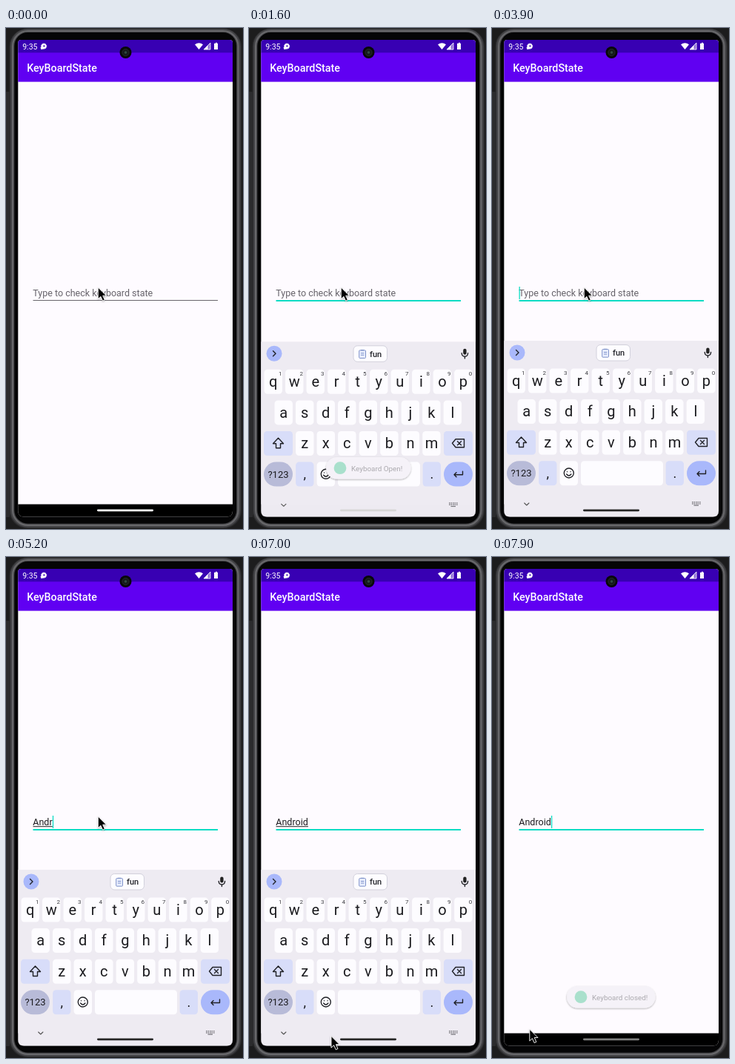
An HTML page for the animation above (8000 ms loop, 320 by 676 pixels).

```html
<!DOCTYPE html>
<html lang="en">
<head>
<meta charset="utf-8">
<title>Keyboard state</title>
<style>
  html, body { margin: 0; width: 100%; height: 100%; overflow: hidden; background: #1c1c1d; }
  svg { display: block; width: 100%; height: 100%; font-family: Roboto, sans-serif; }
  .line { fill: none; stroke: #202126; stroke-width: 1.4; stroke-linecap: round; stroke-linejoin: round; }
  .mid { text-anchor: middle; }
</style>
</head>
<body>
<svg viewBox="0 0 320 676">
  <defs>
    <clipPath id="screenClip"><path d="M20.3 16H302Q306 16 306 20V651.5Q306 659.5 298 659.5H24.3Q16.3 659.5 16.3 651.5V20Q16.3 16 20.3 16Z"/></clipPath>
    <filter id="shadow" x="-20%" y="-30%" width="140%" height="180%">
      <feDropShadow dx="0" dy="1" stdDeviation="1.3" flood-opacity=".32"/>
    </filter>
  </defs>

  <rect width="320" height="676" fill="#1c1c1d"/>
  <path d="M0 86H5V660H0Z" fill="#2b2b2d"/>
  <g fill="none">
    <rect x="4.5" y="1" width="313.5" height="674" rx="24" fill="#2c2c2e"/>
    <rect x="8.5" y="3.5" width="305.5" height="668" rx="21" stroke="#444447" stroke-width="5"/>
    <rect x="9" y="4" width="304.5" height="667" rx="20.5" stroke="#68686b" stroke-width="2"/>
    <rect x="11.5" y="6" width="299.5" height="662.5" rx="18" fill="#050506"/>
  </g>

  <g clip-path="url(#screenClip)">
    <rect x="16" y="16" width="290" height="644" fill="#fefbff"/>
    <rect x="16" y="33" width="290" height="39.6" fill="#6000f2"/>
    <rect x="16" y="16" width="290" height="17.3" fill="#3800b3"/>
    <g fill="#fff">
      <text x="22.2" y="28.8" font-size="10.5">9:35</text>
      <path d="M46.5 26.2L49.8 24.5L51 28.2L47.4 29Z"/>
      <circle cx="51.1" cy="24.6" r="3.5"/>
      <circle cx="51.1" cy="24.6" r="3.6" fill="none" stroke="#fff" stroke-dasharray="1.2 1.06"/>
      <circle cx="51.4" cy="24.4" r="1.1" fill="#3800b3"/>
      <path d="M255 22.2Q260.5 18.2 266 22.2L260.5 29Z"/>
      <path d="M272.5 23.5V29H267Z"/>
      <path d="M276 20V29H267Z" fill="#fff" fill-opacity=".45" stroke="#fff" stroke-width=".8"/>
      <path d="M282 20.7H283V19.7H285V20.7H286V29H281V20.7Z"/>
      <text x="28.2" y="58.7" font-size="14.3" font-weight="500">KeyBoardState</text>
    </g>

    <text id="field" x="36.3" y="362" font-size="12.5"></text>
    <path id="composing" stroke="#222" stroke-width="1"/>
    <path id="underline"/>
    <rect id="caret" y="349" width="1.3" height="17" fill="#0cdcc4"/>

    <rect x="16" y="642.6" width="290" height="18" fill="#000"/>

    <g id="keyboard">
      <rect x="16" y="422" width="290" height="239" fill="#eeebf2"/>
      <circle cx="34" cy="438" r="10.5" fill="#a9b8fb"/>
      <path class="line" d="M32.5 434.5L36 438L32.5 441.5"/>
      <g id="chip">
        <rect x="141" y="427.5" width="45.5" height="21.5" rx="5.5" fill="#fdfcff" stroke="#cfcdd8" stroke-width=".9"/>
        <rect x="148.7" y="433.6" width="8.8" height="10.6" rx="1" fill="#e9eeff" stroke="#7f92c8"/>
        <path d="M151 433.3H155.2M151 437.5H155.3M151 440H155.3" stroke="#7f92c8" stroke-width="1.1"/>
        <text x="163" y="442.4" font-size="11" font-weight="500" fill="#25262c">fun</text>
      </g>
      <rect x="289.2" y="431.5" width="4.4" height="8" rx="2.2" fill="#222"/>
      <path class="line" d="M287.2 437.5Q287.5 442 291.4 442Q295.3 442 295.6 437.5M291.4 442V444.6"/>
      <g id="keys"></g>
      <path class="line" d="M39.5 552L46.5 559.5H42.5V565.5H36.5V559.5H32.5Z"/>
      <path class="line" d="M279 553.5H290.5V564.5H279L274.5 559ZM281.5 556.5L286.5 561.5M286.5 556.5L281.5 561.5"/>
      <circle class="line" cx="103.8" cy="600.5" r="6.5"/>
      <path class="line" d="M100.7 602Q103.8 606 106.9 602M101.5 598.6V598.7M106.1 598.6V598.7"/>
      <path class="line" d="M288.5 597V601.5H277M280 598.5L277 601.5L280 604.5"/>
      <path class="line" d="M43.7 641L46.8 644L49.9 641" style="stroke:#555;stroke-width:1.1"/>
      <path d="M270 639.7H281.5M270 642H281.5" stroke="#77767c" stroke-width="1.4" stroke-dasharray="1.5 1"/>
      <path d="M272.5 644.2H279" stroke="#77767c" stroke-width="1.2"/>
    </g>

    <g id="toast">
      <rect id="toastBody" y="579" height="29.5" rx="14.75" fill="#f5f2f8" filter="url(#shadow)"/>
      <g id="toastContent">
        <circle id="toastIcon" cy="593.7" r="8.4" fill="#16bf78"/>
        <text id="toastText" y="597.6" font-size="9.9" fill="#1d1d20"></text>
      </g>
    </g>
    <rect id="handle" x="123" y="649.4" width="76" height="2.8" rx="1.4"/>
  </g>

  <circle cx="161.5" cy="33" r="8" fill="#08090a"/>
  <circle cx="161.5" cy="33" r="4.6" fill="#15191b" stroke="#26292b"/>
  <circle cx="161.5" cy="33" r="1.8" fill="#304841"/>

  <path id="pointer" d="M0 0V15.6L3.6 12.3L6.3 18.2L9 17L6.4 11.2H11.2Z"
        fill="#000" stroke="#fff" stroke-width=".9" filter="url(#shadow)"/>
</svg>

<script>
const LOOP = 8000;
const el = id => document.getElementById(id);
const set = (id, attrs) => {
  for (const name in attrs) el(id).setAttribute(name, attrs[name]);
};
const ramp = (t, from, to) => Math.min(1, Math.max(0, (t - from) / (to - from)));
const smooth = p => p * p * (3 - 2 * p);
const mix = (a, b, p) => a + (b - a) * p;

// Timing curve with control points (x1, y1) and (x2, y2), solved by bisection.
function bezier(x, x1, y1, x2, y2) {
  const at = (s, a, b) => 3 * (1 - s) ** 2 * s * a + 3 * (1 - s) * s * s * b + s ** 3;
  let low = 0, high = 1;
  for (let i = 0; i < 24; i++) {
    const s = (low + high) / 2;
    if (at(s, x1, x2) < x) low = s; else high = s;
  }
  return at(low, y1, y2);
}

function buildKeys() {
  const pitch = 28.52;
  let markup = '';
  const key = (x, y, width, fill = '#fdfcff', radius = 4.5) =>
    markup += `<rect x="${x}" y="${y}" width="${width}" height="33" rx="${radius}" fill="${fill}"/>`;
  const label = (x, y, size, text, fill = '#1b1b1f') =>
    markup += `<text class="mid" x="${x}" y="${y}" font-size="${size}" fill="${fill}">${text}</text>`;

  [['qwertyuiop', 32.7], ['asdfghjkl', 46.7], ['zxcvbnm', 75.3]].forEach(([letters, left], row) => {
    [...letters].forEach((letter, i) => {
      const x = left + i * pitch, y = 459.5 + row * 41.6;
      key(x - 12.2, y, 24.4);
      label(x, y + 23.2, 20, letter);
      if (row === 0) label(x + 9.5, y + 8.7, 8, (i + 1) % 10, '#3c3c42');
    });
  });
  const tint = '#d8ddf9', accent = '#a9b8fb';
  key(20, 542.7, 39, tint);
  key(263, 542.7, 39, tint);
  key(20, 584.3, 39, '#b8bbd8', 16.5);
  key(63.1, 584.3, 24.4, tint);
  key(91.6, 584.3, 24.4);
  key(120, 584.3, 111);
  key(234.6, 584.3, 24.4, tint);
  key(263, 584.3, 39, accent, 16.5);
  label(39.5, 605.3, 13, '?123');
  label(75.3, 607, 18, ',');
  label(246.8, 607, 18, '.');
  el('keys').innerHTML = markup;
}

const word = 'Android';
const keyTimes = [4500, 4730, 4950, 5150, 5450, 5750, 6050];

function caretVisible(t) {
  if (t < 300) return false;
  if (t < 800) return true;
  if (t < 1850) return false;
  if (t < keyTimes[0]) return (t - 1850) % 1000 < 500;
  return t < 6550 || t >= 7050;
}

function drawField(t) {
  const typed = word.slice(0, keyTimes.filter(time => t >= time).length);
  const field = el('field');
  const focused = t >= 200;
  field.textContent = typed || 'Type to check keyboard state';
  field.setAttribute('fill', typed ? '#1d1b1f' : '#66636a');
  const end = 36.5 + (typed ? field.getComputedTextLength() : 0);
  set('composing', { d: typed && t < 7650 ? `M36.5 363.7H${end}` : '' });
  set('underline', focused
    ? { d: 'M36.5 368H286', stroke: '#0cdcc4', 'stroke-width': 2 }
    : { d: 'M36.5 367.5H286', stroke: '#69666c', 'stroke-width': 1 });
  set('caret', { x: end, opacity: +caretVisible(t) });
}

function drawKeyboard(t) {
  const shown = t < 7000
    ? bezier(ramp(t, 1351, 1636), .2, 0, 0, 1)
    : 1 - bezier(ramp(t, 7560, 7845), .4, 0, 1, 1);
  set('keyboard', { opacity: shown, transform: `translate(0 ${237 * (1 - shown)})` });
  const size = mix(.42, 1, ramp(t, 1400, 1560));
  set('chip', { transform: `translate(164 438.5) scale(${size}) translate(-164 -438.5)` });

  const dark = ramp(t, 1560, 1780) - ramp(t, 7810, 8030);
  const gray = Math.round(mix(255, 38, dark));
  set('handle', { fill: `rgb(${gray},${gray},${gray})` });
}

function drawToast(t) {
  const closing = t > 7000;
  const alpha = closing ? ramp(t, 7800, 8100) : ramp(t, 1500, 1800) - ramp(t, 3700, 3900);
  const left = closing ? 101 : 104;
  set('toast', { opacity: Math.min(1, alpha * 3) });
  set('toastBody', { x: left, width: closing ? 119.5 : 114.5 });
  set('toastContent', { opacity: alpha });
  set('toastIcon', { cx: left + 19 });
  set('toastText', { x: left + 34 });
  el('toastText').textContent = closing ? 'Keyboard closed!' : 'Keyboard Open!';
}

function drawPointer(t) {
  const down = smooth(ramp(t, 6250, 6950)), across = smooth(ramp(t, 7000, 7400));
  const x = mix(mix(124.3, 111, down), 50.8, across);
  const y = mix(mix(350, 646.5, down), 637.3, across);
  set('pointer', { transform: `translate(${x} ${y})` });
}

function draw(now) {
  const t = now % LOOP;
  drawField(t);
  drawKeyboard(t);
  drawToast(t);
  drawPointer(t);
}

buildKeys();
const start = performance.now();
function tick() {
  draw(performance.now() - start);
  requestAnimationFrame(tick);
}
tick();
</script>
</body>
</html>
```
